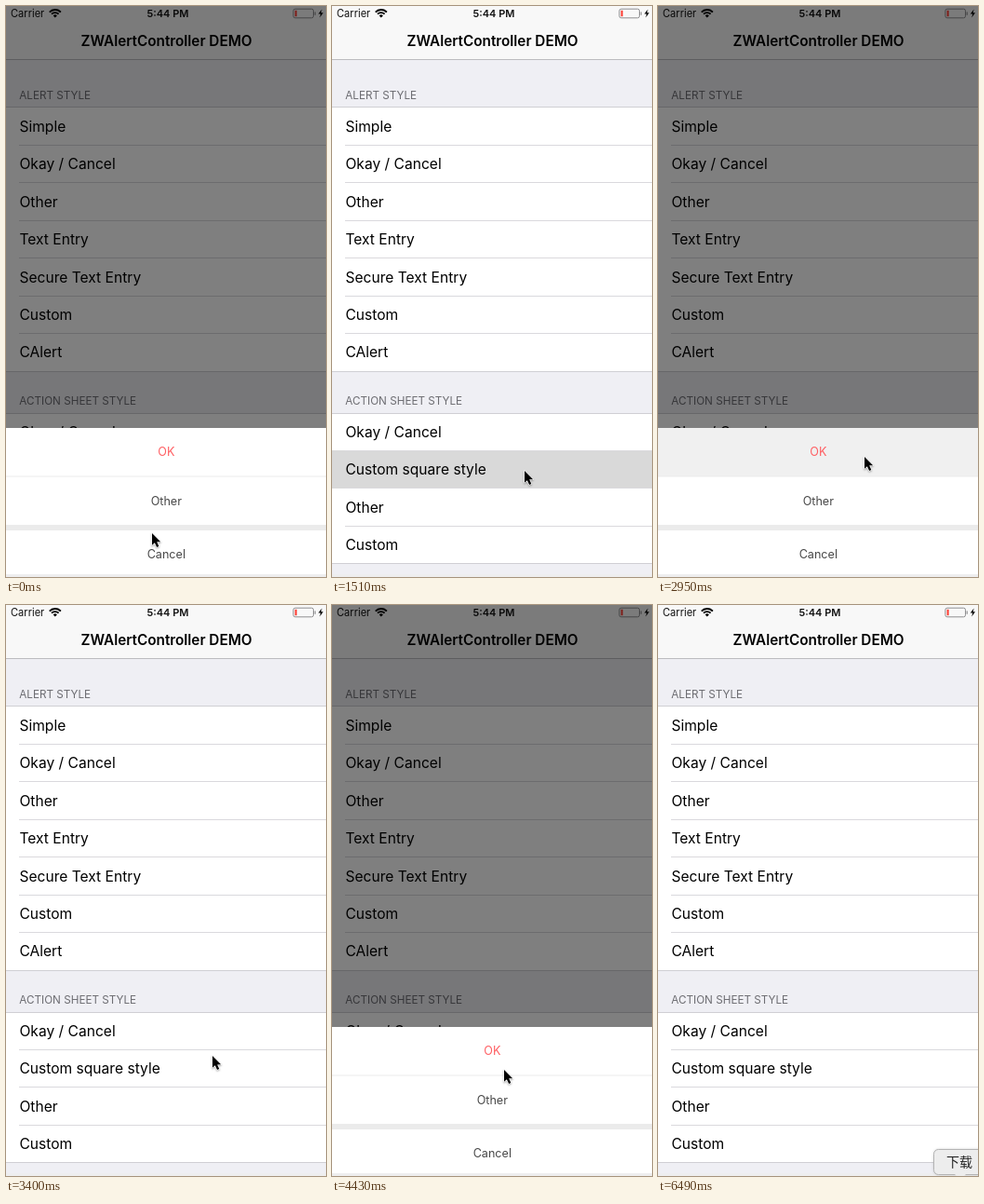
Animation, 344 px wide and 613 px high, one loop 7050 ms. Source, as an HTML page with a canvas:

```html
<!DOCTYPE html>
<html lang="en">
<head>
<meta charset="utf-8">
<title>Action sheet demo</title>
<style>
  html, body { margin: 0; width: 100%; height: 100%; overflow: hidden; background: #efeff4; }
  canvas { display: block; width: 344px; height: 613px; }
</style>
</head>
<body>
<canvas id="stage"></canvas>
<script>
const W = 344, H = 613, LOOP = 7050;
const ROW = 40.45, REST = 453, TRAVEL = 202;
const canvas = document.getElementById('stage');
const ctx = canvas.getContext('2d');
const dpr = window.devicePixelRatio || 1;
canvas.width = W * dpr;
canvas.height = H * dpr;

const sections = [
  { title: 'ALERT STYLE', titleY: 95.5, top: 108.9,
    rows: ['Simple', 'Okay / Cancel', 'Other', 'Text Entry', 'Secure Text Entry', 'Custom', 'CAlert'] },
  { title: 'ACTION SHEET STYLE', titleY: 423.5, top: 437,
    rows: ['Okay / Cancel', 'Custom square style', 'Other', 'Custom'] }
];

const buttons = [
  { label: 'OK', top: 0, height: 51.5, textY: 25.5, color: '#ff5f63' },
  { label: 'Other', top: 52.5, height: 51.5, textY: 78, color: '#484848' },
  { label: 'Cancel', top: 110, height: 51, textY: 135, color: '#484848' }
];

// Each visit: row touched, sheet springs in, button pressed, sheet slides out.
// Slides are redrawn every STEP ms, at times aligned with showStep and hideStep.
const visits = [
  { tap: -2000, show: -1500, showStep: -1470, press: 470, hide: 542, hideStep: 580, button: 2 },
  { tap: 1510, show: 1620, showStep: 1650, press: 2950, hide: 3036, hideStep: 3100, button: 0 },
  { tap: 3990, show: 4100, showStep: 4130, press: 5380, hide: 5426, hideStep: 5490, button: 1 }
];
const HIDE_TIME = 150, PEAK_TIME = 120, STEP = 90;

// time, x, y of the pointer tip
const pointerPath = [
  [60, 157, 566], [260, 152, 590], [740, 152, 590], [1160, 195, 510],
  [1200, 195, 510], [1300, 207, 499], [1950, 207, 499], [2350, 166, 476],
  [2589, 166, 476], [2590, 222, 484], [3390, 222, 484], [3810, 185, 499],
  [4440, 185, 499], [4680, 187, 526], [4920, 195, 552], [5140, 198, 541.5],
  [5980, 198, 541.5], [6490, 334, 614]
];

const clamp = v => Math.max(0, Math.min(1, v));
const smooth = u => u * u * (3 - 2 * u);
const stepped = (t, anchor) => anchor + Math.floor((t - anchor) / STEP) * STEP;

function spring(ms) {
  const a = ms * Math.PI / PEAK_TIME, decay = 0.87;
  return 1 - Math.exp(-decay * a) * (Math.cos(a) + decay * Math.sin(a));
}

function rect(x, y, w, h, color) {
  ctx.fillStyle = color;
  ctx.fillRect(x, y, w, h);
}

// y is the middle of the capitals
function text(str, x, y, size, color, weight = 400, align = 'left', family = 'Inter') {
  ctx.font = `${weight} ${size}px "${family}", sans-serif`;
  ctx.textAlign = align;
  ctx.fillStyle = color;
  ctx.fillText(str, x, y + size * 0.364);
}

function polygon(points) {
  ctx.beginPath();
  points.forEach(([x, y]) => ctx.lineTo(x, y));
  ctx.closePath();
}

function drawStatusBar() {
  text('Carrier', 5, 8, 11.1, '#111');
  text('5:44 PM', 174, 8, 11, '#111', 600, 'center');

  ctx.strokeStyle = ctx.fillStyle = '#000';
  ctx.lineWidth = 1.8;
  for (const r of [5.2, 8.3]) {
    ctx.beginPath();
    ctx.arc(52.8, 12.3, r, -Math.PI * 0.76, -Math.PI * 0.24);
    ctx.stroke();
  }
  ctx.beginPath();
  ctx.moveTo(52.8, 12.6);
  ctx.arc(52.8, 12.3, 2.8, -Math.PI * 0.76, -Math.PI * 0.24);
  ctx.fill();

  ctx.strokeStyle = '#8f8f91';
  ctx.lineWidth = 1;
  ctx.beginPath();
  ctx.roundRect(308.9, 3.2, 21.6, 9.6, 2);
  ctx.stroke();
  rect(331.6, 6.4, 1.2, 3.4, '#8f8f91');
  rect(310.6, 4.8, 2, 6.4, '#ff3b30');

  polygon([[339.6, 3.4], [335.8, 8.6], [338.2, 8.6], [337.2, 12.6], [341, 7.2], [338.6, 7.2]]);
  ctx.fillStyle = '#000';
  ctx.fill();
}

function drawPage(selected) {
  rect(0, 0, W, H, '#efeff4');
  rect(0, 0, W, 57, '#f8f8f8');
  rect(0, 57, W, 1, '#bcbcbf');
  drawStatusBar();
  text('ZWAlertController DEMO', 172.5, 37.3, 15.3, '#000', 600, 'center');

  for (const { title, titleY, top, rows } of sections) {
    const height = rows.length * ROW;
    const first = Math.floor(top), last = Math.floor(top + height);
    text(title, 14.3, titleY, 11.7, '#6d6d72');
    rect(0, first, W, last - first, '#fff');
    rows.forEach((label, i) => {
      const y = top + i * ROW, line = Math.floor(y);
      if (selected && label === 'Custom square style') rect(0, line, W, 41, '#d9d9d9');
      if (i) rect(14, line, W, 1, '#dad9dd');
      text(label, 14.4, y + ROW / 2 - 0.1, 15.6, '#000');
    });
    rect(0, first, W, 1, '#d0cfd4');
    rect(0, last, W, 1, '#d0cfd4');
  }
}

function drawSheet(top, pressed) {
  rect(0, top, W, H, '#ebebeb');
  buttons.forEach((b, i) => {
    rect(0, top + b.top, W, b.height, i === pressed ? '#f0f0f0' : '#fff');
    text(b.label, 172.3, top + b.textY, 12.6, b.color, 400, 'center');
  });
}

function drawPointer(t) {
  if (t >= 6490) return;
  const next = pointerPath.findIndex(p => p[0] > t);
  const b = pointerPath[next], a = pointerPath[Math.max(0, next - 1)];
  const u = a === b ? 0 : smooth((t - a[0]) / (b[0] - a[0]));
  ctx.save();
  ctx.translate(a[1] + (b[1] - a[1]) * u, a[2] + (b[2] - a[2]) * u);
  ctx.scale(0.85, 0.85);
  polygon([[0, 0], [0, 15], [3.4, 12], [6, 17.6], [8.6, 16.4], [6.1, 11], [10.8, 10.8]]);
  ctx.lineJoin = 'round';
  ctx.lineWidth = 1.6;
  ctx.strokeStyle = '#fff';
  ctx.shadowColor = 'rgba(0,0,0,.35)';
  ctx.shadowBlur = 2 * dpr;
  ctx.shadowOffsetY = dpr;
  ctx.stroke();
  ctx.shadowColor = 'transparent';
  ctx.fillStyle = '#000';
  ctx.fill();
  ctx.restore();
}

function drawTooltip() {
  ctx.save();
  ctx.beginPath();
  ctx.roundRect(296.5, 584.5, 62, 27, 5);
  ctx.fillStyle = '#ededed';
  ctx.shadowColor = 'rgba(0,0,0,.22)';
  ctx.shadowBlur = 3 * dpr;
  ctx.fill();
  ctx.shadowColor = 'transparent';
  ctx.strokeStyle = '#b4b4b4';
  ctx.lineWidth = 1;
  ctx.stroke();
  polygon([[319, 611], [331, 611], [325, 617]]);
  ctx.fillStyle = '#ededed';
  ctx.fill();
  text('下载', 324, 597.7, 14, '#222', 400, 'center', 'Noto Sans CJK SC');
  ctx.restore();
}

function draw(t) {
  ctx.setTransform(dpr, 0, 0, dpr, 0, 0);
  const visit = visits.find(v => t >= v.tap && stepped(t, v.hideStep) < v.hide + HIDE_TIME);
  drawPage(visit && t < visit.show + PEAK_TIME);

  const shownFor = visit ? stepped(t, visit.showStep) - visit.show : -1;
  if (shownFor >= 0) {
    const out = smooth(clamp((stepped(t, visit.hideStep) - visit.hide) / HIDE_TIME));
    const dim = 0.5 * clamp(shownFor / PEAK_TIME) * (1 - out);
    rect(0, 0, W, H, `rgba(0,0,0,${dim})`);
    const top = REST + TRAVEL * (1 - spring(shownFor) + out);
    drawSheet(Math.round(top), t >= visit.press ? visit.button : -1);
  }
  rect(0, 610, W, 3, '#eeeeef');
  drawPointer(t);
  if (t >= 6490) drawTooltip();
}

const start = performance.now();
function tick() {
  draw((performance.now() - start) % LOOP);
  requestAnimationFrame(tick);
}
tick();
</script>
</body>
</html>
```
